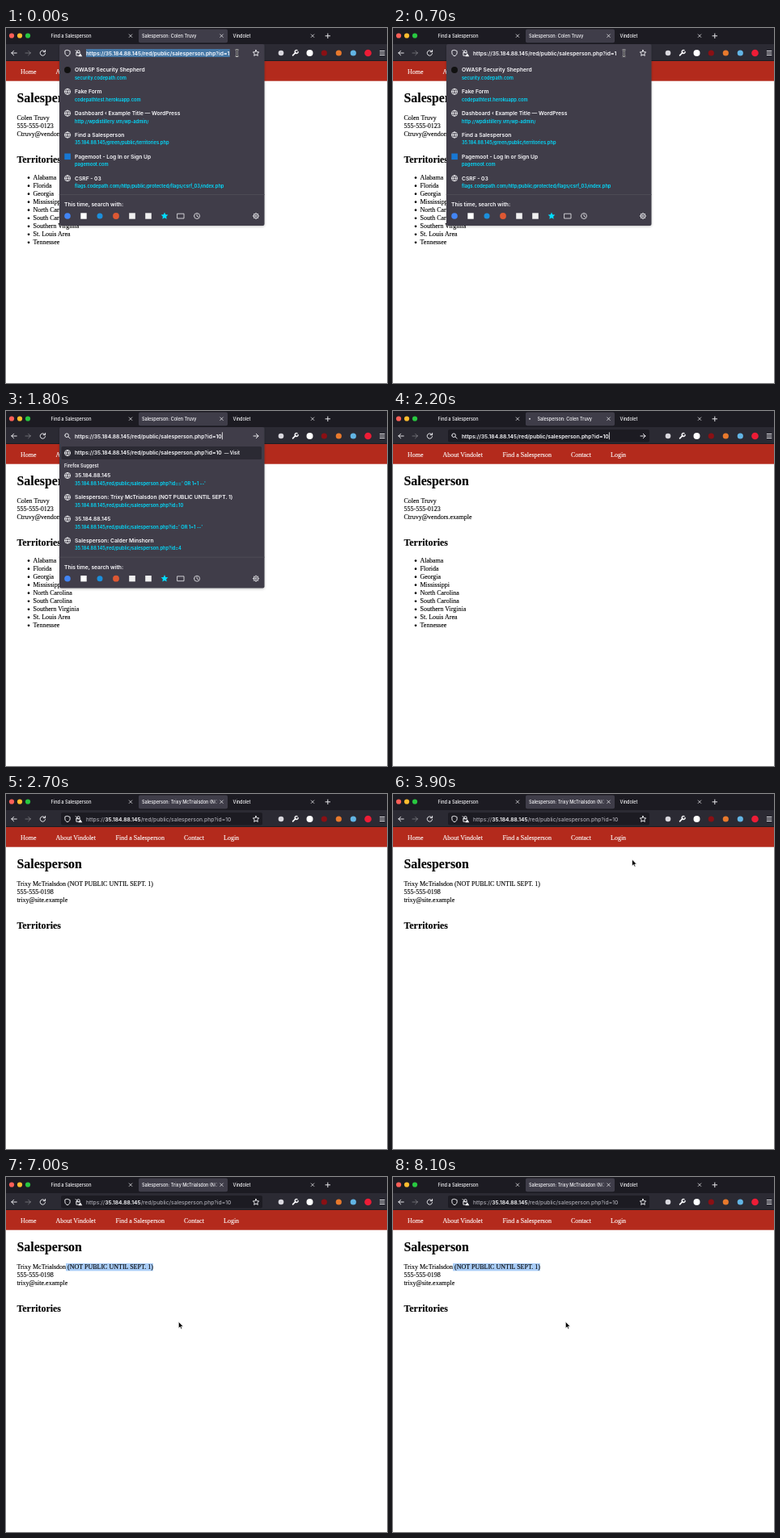
Animation of 471 by 440 pixels, one loop 8500 ms. Source, as an HTML page:

```html
<!DOCTYPE html>
<html lang="en">
<head>
<meta charset="utf-8">
<title>Salesperson lookup</title>
<style>
  html, body { margin: 0; width: 100%; height: 100%; overflow: hidden; background: #fff; }
  svg { display: block; width: 471px; height: 440px; }
  .ui { font-family: Inter, sans-serif; font-weight: 600; fill: #fbfbfe; }
  .tab { font-weight: 500; }
  .page { font-family: "Liberation Serif", serif; font-size: 8px; fill: #000; }
  .page text { stroke: currentColor; stroke-width: .12; }
  .nav { color: #fff; fill: #fff; }
  .line { fill: none; stroke: #fbfbfe; stroke-width: .9; stroke-linecap: round; stroke-linejoin: round; }
  .link { fill: #00ddff; }
  .dim { fill: #a9a8b0; font-weight: 500; }
  .head { font-weight: 700; }
  text { white-space: pre; }
</style>
</head>
<body>
<svg id="stage" viewBox="0 0 471 440" xmlns="http://www.w3.org/2000/svg"></svg>
<script>
const LOOP = 8500, STEP = 100;
const HOST = '35.184.88.145', PATH = '/red/public/salesperson.php?id=';
const SITE = 'Vindolet', FIRST = 'Colen Truvy', SECOND = 'Trixy McTrialsdon';
const NOTE = ' (NOT PUBLIC UNTIL SEPT. 1)';
const RAISED = '#3f3d49';

// Markup helpers
const text = (x, y, s, size, attrs = '') =>
  `<text x="${x}" y="${y}" ${size ? `font-size="${size}"` : ''} ${attrs}>${s}</text>`;
const rect = (x, y, w, h, fill, attrs = '') =>
  `<rect x="${x}" y="${y}" width="${w}" height="${h}" fill="${fill}" ${attrs}/>`;
const dot = (x, y, r, fill, attrs = '') => `<circle cx="${x}" cy="${y}" r="${r}" fill="${fill}" ${attrs}/>`;
const line = (d, attrs = '') => `<path class="line" d="${d}" ${attrs}/>`;
const group = (id, body, attrs = '') => `<g id="${id}" ${attrs}>${body}</g>`;
const at = (x, y, body) => `<g transform="translate(${x} ${y})">${body}</g>`;

const circlePath = r => `M${-r} 0a${r} ${r} 0 1 1 ${2 * r} 0a${r} ${r} 0 1 1 ${-2 * r} 0`;
const globe = (x, y) => at(x, y, line(
  circlePath(3.6) + 'M-3.6 0H3.6M0-3.6C-2-1.5-2 1.5 0 3.6C2 1.5 2-1.5 0-3.6', 'style="stroke-width:.8"'));
const close = x => line(`M${x - 1.8} 7.9l3.6 3.6m0-3.6l-3.6 3.6`, 'style="stroke-width:.7"');
const glass = at(76, 31, line('M1 .9L3.2 3.1M-3.2-.8a2.3 2.3 0 1 1 4.6 0a2.3 2.3 0 1 1-4.6 0'));
const go = at(309, 31, line('M-3 0H3M.3-2.7L3 0L.3 2.7'));

function star(x, y, r, attrs) {
  const pts = Array.from({ length: 10 }, (_, i) => {
    const a = i * Math.PI / 5, k = i % 2 ? r * .48 : r;
    return `${(x + k * Math.sin(a)).toFixed(2)} ${(y - k * Math.cos(a)).toFixed(2)}`;
  });
  return `<path d="M${pts.join('L')}Z" ${attrs}/>`;
}

function gear(x, y) {
  let spokes = '';
  for (let i = 0; i < 8; i++) {
    const c = Math.cos(i * Math.PI / 4), s = Math.sin(i * Math.PI / 4);
    spokes += `M${3 * c} ${3 * s}L${3.7 * c} ${3.7 * s}`;
  }
  return at(x, y, line(circlePath(3) + circlePath(1.2) + spokes, 'style="stroke-width:.75"'));
}

// Browser frame
const tabs = rect(0, 0, 471, 20, '#1c1b22') +
  ['#fe5f57', '#febc2e', '#28c840'].map((c, i) => dot(7 + 10 * i, 9.5, 3.1, c)).join('') +
  text(55.5, 11.7, 'Find a Salesperson', 5.5) +
  rect(164, 1.5, 110, 16.7, RAISED, 'rx="2"') +
  `<g clip-path="url(#tabClip)">${text(168, 11.7, '', 5.5, 'id="tabTitle"')}</g>` +
  rect(256, 3, 6, 13, 'url(#fade)') +
  dot(169, 9.7, 1, '#d5d4da', 'id="spinner"') +
  text(280.5, 11.7, SITE, 5.5) +
  close(154) + close(266.5) + close(379) + line('M395 9.8h5.6m-2.8-2.8v5.6');

const toolbar = rect(0, 20, 471, 21, '#2b2a33') + rect(0, 40.4, 471, .6, '#15141a') +
  line('M13.2 31H6.8m2.8-2.8L6.8 31l2.8 2.8') +
  line('M24 31h6.4m-2.8-2.8l2.8 2.8l-2.8 2.8', 'opacity=".35"') +
  line('M48.2 29.4A3.2 3.2 0 1 0 48.6 31.6M48.6 27.4v2.3h-2.4') +
  rect(68, 23, 249, 15.5, '#1c1b22', 'rx="2"') +
  dot(340, 31, 3.3, '#d9d8de') +
  line('M354.6 33.8l3.5-3.5', 'style="stroke-width:1.7"') +
  line('M359.9 27.7a2 2 0 1 0 1.2 1.8', 'style="stroke-width:1.4"') +
  dot(375.5, 31, 4, '#fff') + dot(393.3, 31, 3.6, '#8a1014') + dot(411.3, 31, 3.6, '#e8792c') +
  dot(429.3, 31, 3.6, '#62b5e5') + dot(447.5, 31, 4.3, '#ed1c36') +
  line('M462.3 28.5h5.6m-5.6 2.5h5.6m-5.6 2.5h5.6');

// Web page
const nav = rect(0, 41, 471, 24.7, '#b32a1c') +
  [[18, 'Home'], [61.5, 'About ' + SITE], [135.5, 'Find a Salesperson'], [220, 'Contact'], [269, 'Login']]
    .map(([x, s]) => text(x, 57.4, s, 8, 'class="nav"')).join('');
const details = rows => rows.map((s, i) => text(13.5, 114.1 + 9.95 * i, s)).join('');
const states = ['Alabama', 'Florida', 'Georgia', 'Mississippi', 'North Carolina', 'South Carolina',
  'Southern Virginia', 'St. Louis Area', 'Tennessee'];
const page = rect(0, 41, 471, 399, '#fff') + nav +
  text(13.5, 91.8, 'Salesperson', 15.9, 'class="head"') +
  text(13.5, 167, 'Territories', 11.9, 'class="head"') +
  group('oldPage', details([FIRST, '555-555-0123', 'Ctruvy@vendors.example']) +
    states.map((s, i) => dot(28, 185.6 + 10.03 * i, 1.35, '#000') + text(33.5, 188 + 10.03 * i, s)).join('')) +
  group('newPage', rect(0, 107, 0, 9.4, '#a9cdf8', 'id="mark"') +
    details([`<tspan id="who">${SECOND}</tspan>${NOTE}`, '555-555-0198', 'trixy@site.example']));

// Address bar drop-down
const row = (y, title, sub, icon) => (icon || globe(76, y)) +
  text(85, y + 2.4, title, 6.7) + text(85, y + 11.9, sub, 5.7, 'class="link"');
const panel = bottom => rect(66, 20, 253.5, bottom - 20, RAISED, 'rx="2" filter="url(#shadow)"');
const engines = y => line(`M66 ${y - 26.5}H319.5`, 'style="stroke:#56545f;stroke-width:.6"') +
  text(72, y - 11.8, 'This time, search with:', 6.7) +
  dot(76, y, 3.8, '#4285f4') + rect(92.3, y - 3.7, 7.4, 7.4, '#fff') + dot(116, y, 3.5, '#1b8fdc') +
  dot(136, y, 3.9, '#de5833') + rect(152.2, y - 3.7, 7.6, 7.4, '#f0f0f0') + rect(172.2, y - 3.7, 7.6, 7.4, '#f0f0f0') +
  star(196, y, 4.6, 'fill="#00ddff"') +
  line(`M212 ${y - 2.8}h8v5.8h-8z`, 'style="stroke-width:.75"') +
  at(236, y, line(circlePath(3.5) + 'M0-2V.2L1.6 1', 'style="stroke-width:.75"')) + gear(309, y);

const recent = panel(245) + [
  ['OWASP Security Shepherd', 'security.codepath.com', dot(76, 52, 4, '#111')],
  ['Fake Form', 'codepathtest.herokuapp.com'],
  ['Dashboard ‹ Example Title — WordPress', 'http://wpdistillery.vm/wp-admin/'],
  ['Find a Salesperson', HOST + '/green/public/territories.php'],
  ['Pagemoot - Log In or Sign Up', 'pagemoot.com', rect(72.3, 155.5, 7.6, 7.6, '#1877d2')],
  ['CSRF - 03', 'flags.codepath.com/http/public/protected/flags/csrf_03/index.php']
].map((r, i) => row(52 + 26.85 * i, ...r)).join('') + engines(233);

const suggest = panel(219.5) + rect(68.5, 44, 247.5, 16, '#2b2a33', 'rx="1.5"') + globe(76, 52) +
  text(85, 54.4, '', 6.7, 'id="visit"') +
  text(72, 69.5, 'Firefox Suggest', 5.6) + [
  [HOST, HOST + PATH + "=' OR 1=1 --'"],
  ['Salesperson: ' + SECOND + NOTE, HOST + PATH + '10'],
  [HOST, HOST + PATH + "' OR 1=1 --'"],
  ['Salesperson: Calder Minshorn', HOST + PATH + '4']
].map((r, i) => row(80 + 26.85 * i, ...r)).join('') + engines(207.7);

const siteIcons = at(76, 31, line('M0-3.6L3.1-2.5V0C3.1 1.8 1.7 3 0 3.8C-1.7 3-3.1 1.8-3.1 0V-2.5Z')) +
  at(89.5, 31, line('M-1.6-.3V-1.8a1.6 1.6 0 0 1 3.2 0V-.3M-2.6-.3H1.6M-2.6-.3V3.2H.2M-3.4-3.4L.5.5') +
    '<path d="M2.3.2L4.8 4.2H-.2Z" fill="#fbfbfe"/>') +
  star(309, 31.2, 3.9, 'class="line"');

const pointers =
  group('arrow', '<path d="M0 0V8.2L1.9 6.5L3.2 9.3L4.5 8.7L3.3 6H5.8Z" fill="#000" stroke="#fff" stroke-width=".7"/>') +
  group('beam', ['#fff', '#111'].map((c, i) =>
    `<path d="M-1.8-4.2Q0-4.2 0-3V3Q0 4.2-1.8 4.2M1.8-4.2Q0-4.2 0-3M0 3Q0 4.2 1.8 4.2" fill="none" stroke="${c}" stroke-width="${i ? .8 : 1.7}"/>`).join(''));

const stage = document.getElementById('stage');
stage.innerHTML = `<defs>
  <clipPath id="tabClip"><rect x="166" y="2" width="96" height="16"/></clipPath>
  <linearGradient id="fade"><stop stop-color="${RAISED}" stop-opacity="0"/><stop offset="1" stop-color="${RAISED}"/></linearGradient>
  <filter id="shadow" x="-10%" y="-10%" width="120%" height="120%"><feDropShadow dx="0" dy="1" stdDeviation="1.5" flood-opacity=".25"/></filter>
  </defs>` +
  group('web', page, 'class="page"') +
  group('chrome', `<g class="tab">${tabs}</g>` + toolbar + group('recent', recent) + group('suggest', suggest) +
    group('siteIcons', siteIcons) + group('searchIcons', glass + go) +
    rect(99, 26, 0, 10, '#4577a5', 'id="urlMark"') +
    text(99, 33.5, '', 6.7, 'id="url"') + rect(0, 26.3, .8, 9, '#fbfbfe', 'id="caret"'), 'class="ui"') +
  pointers;

const el = Object.fromEntries([...stage.querySelectorAll('[id]')].map(n => [n.id, n]));
const show = (id, on) => { el[id].style.display = on ? '' : 'none'; };
const fill = (id, s) => { if (el[id].dataset.s !== s) { el[id].dataset.s = s; el[id].innerHTML = s; } };
const set = (id, name, v) => el[id].setAttribute(name, v);

// Pointer path: time, x, y
const TRACK = [[0, 285.5, 31], [3000, 285.5, 33], [3800, 295.5, 81], [3900, 295.5, 81], [4100, 191, 102.5],
  [4200, 191, 102.5], [4400, 193, 117], [4600, 186, 109], [4700, 186, 109], [5000, 113, 107.5],
  [5300, 71, 108.5], [5600, 71, 108.5], [6400, 213.3, 179.3], [LOOP, 213.3, 179.3]];

function pointer(t) {
  const i = TRACK.findIndex(k => k[0] > t);
  const [t0, x0, y0] = TRACK[i - 1], [t1, x1, y1] = TRACK[i];
  const u = (t - t0) / (t1 - t0), e = u * u * (3 - 2 * u);
  return [x0 + (x1 - x0) * e, y0 + (y1 - y0) * e];
}

const KEYS = [[900, ''], [1600, '1'], [1800, '10']];

function draw(t) {
  const typing = t >= 900, sent = t >= 2000, loaded = t >= 2400;
  const key = KEYS.filter(k => k[0] <= t).pop() || [200, '1'];
  const address = 'https://' + HOST + PATH + key[1];

  show('recent', !typing);
  show('suggest', typing && !sent);
  show('oldPage', !loaded);
  show('newPage', loaded);
  show('siteIcons', !typing || loaded);
  show('searchIcons', typing && !loaded);

  const loading = sent && !loaded;
  show('spinner', loading);
  set('spinner', 'cx', 172 - 3 * Math.cos((t - 2200) / 800 * 2 * Math.PI));
  set('tabTitle', 'x', loading ? 178.5 : 168);
  fill('tabTitle', 'Salesperson: ' + (loaded ? SECOND + NOTE : FIRST));

  const left = typing && !loaded ? 85 : 99;
  set('url', 'x', left);
  fill('url', loaded
    ? `<tspan class="dim">https://</tspan>${HOST}<tspan class="dim">${PATH}10</tspan>` : address);
  fill('visit', `${address}<tspan font-size="5.7" dx="3">— Visit</tspan>`);
  const width = el.url.getComputedTextLength();
  show('urlMark', t < 200);
  set('urlMark', 'width', width + .5);
  set('caret', 'x', left + width + .3);
  show('caret', t >= 200 && !loaded && (t - key[0]) % 1000 < 500);

  const [x, y] = pointer(t);
  const visible = !typing || t >= 3000;
  const overText = y < 39 || (y > 100 && y < 137 && x < 200);
  show('beam', visible && overText);
  show('arrow', visible && !overText);
  for (const id of ['beam', 'arrow']) set(id, 'transform', `translate(${x} ${y})`);

  if (loaded) {
    const start = 13.5 + el.who.getComputedTextLength();
    const end = 13.5 + el.who.parentNode.getComputedTextLength();
    const from = t < 4800 ? end : t < 5600 ? Math.min(end, Math.max(start, x + 4.5)) : start;
    set('mark', 'x', from);
    set('mark', 'width', end - from);
  }
}

const begin = performance.now();
function tick() {
  const t = (performance.now() - begin) % LOOP;
  draw(Math.floor(t / STEP) * STEP);
  requestAnimationFrame(tick);
}
tick();
</script>
</body>
</html>
```
